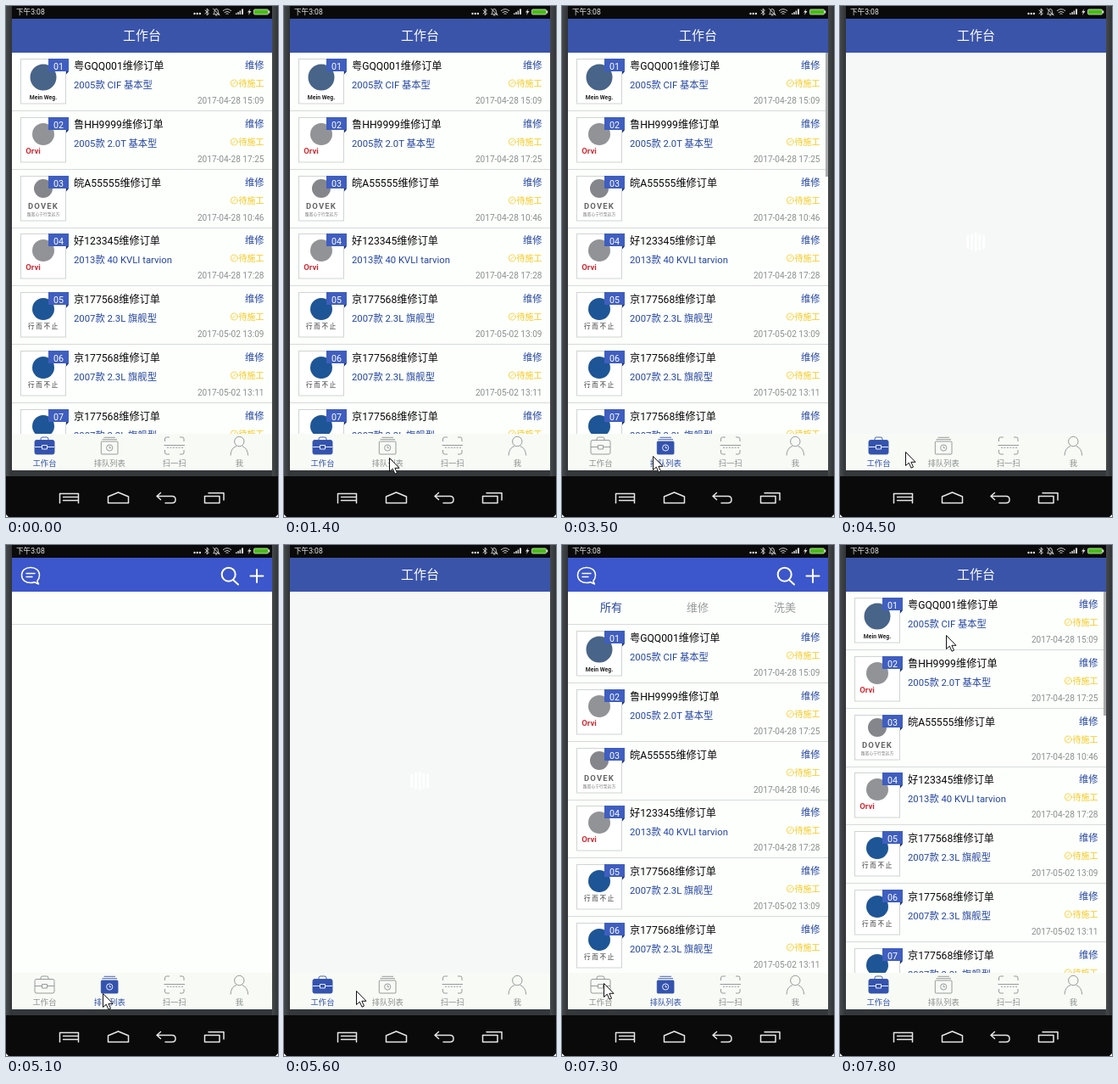
An HTML page that plays this animation: 321x602 px, repeating every 8 s.

```html
<!DOCTYPE html>
<html lang="zh-CN">
<head>
<meta charset="utf-8">
<title>工作台</title>
<style>
html, body { margin: 0; width: 100%; height: 100%; overflow: hidden; background: #fff; }
svg { display: block; font-family: Roboto, "Noto Sans CJK SC", "Noto Sans CJK", sans-serif; }
.line { fill: none; stroke-linecap: round; stroke-linejoin: round; }
.white { stroke: #fff; }
.mid { text-anchor: middle; }
.end { text-anchor: end; }
.blue { fill: #2444a0; }
.tab { fill: #8b9190; font-size: 9.3px; }
.tab .icon { fill: none; stroke: #8b9190; stroke-width: .9; }
.tab.on { fill: #2d4fae; }
.tab.on .icon { stroke: #3453ae; }
.tab.on .body { fill: #3453ae; }
.tab.on .detail { stroke: #fff; }
</style>
</head>
<body>
<svg width="321" height="602" viewBox="0 0 321 602">
  <defs>
    <clipPath id="reveal"><rect id="window" x="7" y="55" width="307" height="449"/></clipPath>
    <linearGradient id="rim"><stop offset="0" stop-color="#45494c"/><stop offset="1" stop-color="#303437"/></linearGradient>
  </defs>

  <path d="M0 0H321V599L318 602H3L0 599Z" fill="#0a0a0a"/>
  <rect width="7" height="554" fill="url(#rim)"/>
  <rect x="314" width="7" height="554" fill="url(#rim)"/>
  <rect x="7" y="547" width="307" height="7" fill="#34383b"/>
  <rect id="paper" x="7" y="15" width="307" height="532"/>

  <g id="status">
    <text x="12" y="10.3" font-size="8.6" fill="#eee">下午3:08</text>
    <g fill="#ddd"><circle cx="222.5" cy="9" r="1.2"/><circle cx="225.7" cy="9" r="1.2"/><circle cx="228.9" cy="9" r="1.2"/>
      <path d="M271 10V8.5H272.5V10ZM273.3 10V7H274.8V10ZM275.6 10V5.5H277.1V10ZM278 10V3.5H280V10ZM288.5 3L285 7.5H287L286 11L289.5 6H287.3Z"/></g>
    <g class="line" stroke="#ddd" stroke-width=".9">
      <path d="M235 5L239.4 8.8L237.2 11V3L239.4 5.2L235 9M245 9.5Q246 8.8 246 6.5Q246 3.5 248 3.5Q250.4 3.5 250.4 6.5Q250.4 8.8 251.4 9.5ZM247.4 11H249M244.5 3L252 11"/>
      <path d="M256.3 5.5Q261 1.6 265.7 5.5M258 7.5Q261 5 264 7.5M259.8 9.2Q261 8.2 262.2 9.2"/>
    </g>
    <rect x="292.5" y="4" width="17" height="6" rx="1.2" fill="#49bd17" stroke="#d9e6d5" stroke-width=".8"/>
    <rect x="310" y="5.5" width="1.3" height="3" fill="#d9e6d5"/>
  </g>

  <g id="workHead">
    <rect x="7" y="15" width="307" height="40" fill="#3a54aa"/>
    <text class="mid" x="160.5" y="39.7" font-size="15" fill="#fff">工作台</text>
  </g>
  <g id="queueHead">
    <rect x="7" y="15" width="307" height="40" fill="#3c56cb"/>
    <g class="line white" stroke-width="1.5">
      <path d="M36.8 42.5Q39.5 39.5 39.5 35.5C39.5 30 35 26.5 29 26.5S18.5 30 18.5 35.5S23 44.5 29 44.5Q31.5 44.5 33.5 43.7L38.5 46ZM24 33.5H34M24 37.5H31"/>
      <path d="M268.5 41.5L274 46.5M288.5 36.5H303.5M296 29V44" stroke-width="2"/>
      <circle cx="262.7" cy="34.7" r="8" stroke-width="2"/>
    </g>
    <path d="M7 93.5H314" stroke="#d6dad8"/>
    <g id="filters" class="mid" font-size="13" fill="#999d9c">
      <text class="blue" x="58" y="78">所有</text><text x="160" y="78">维修</text><text x="263" y="78">洗美</text>
    </g>
  </g>

  <g clip-path="url(#reveal)">
    <g id="list"></g>
    <rect id="bar" x="311" width="3" fill="#a9abab"/>
  </g>
  <g id="loader" fill="#fff"></g>

  <rect x="7" y="504" width="307" height="43" fill="#f8faf5"/>
  <g id="workTab" class="tab">
    <g class="icon"><path d="M41 512V510Q41 508 43 508H48Q50 508 50 510V512"/>
      <rect class="body" x="34" y="511.5" width="23" height="16.5" rx="2"/>
      <path class="detail" d="M34 519.5H42.5M48.5 519.5H57M42.5 517.5H48.5V522H42.5Z"/></g>
    <text class="mid" x="45.5" y="541.5">工作台</text>
  </g>
  <g id="queueTab" class="tab">
    <g class="icon"><path d="M115.5 508.3H129M113.5 510.7H131"/>
      <rect class="body" x="112.3" y="513" width="19.7" height="15" rx="1"/>
      <g class="detail"><circle cx="122.2" cy="520.5" r="3.6"/><path d="M122.2 518.5V520.7H124"/></g></g>
    <text class="mid" x="122.3" y="541.5">排队列表</text>
  </g>
  <g class="tab">
    <g class="icon"><path d="M187.5 513V510Q187.5 508 189.5 508H193M205 508H208Q210 508 210 510V513M210 523V526Q210 528 208 528H205M193 528H189.5Q187.5 528 187.5 526V523M186.5 517.5H211"/>
      <path d="M190 520.3H209" stroke-dasharray="2 1.4"/></g>
    <text class="mid" x="198.7" y="541.5">扫一扫</text>
  </g>
  <g class="tab">
    <g class="icon"><circle cx="275.3" cy="513" r="5.7"/><path d="M265 529.5Q265.5 520.5 272 518.5M278.6 518.5Q285 520.5 285.7 529.5"/></g>
    <text class="mid" x="275.3" y="541.5">我</text>
  </g>

  <g class="line" stroke="#e8e8e8" stroke-width="1.5">
    <path d="M63.5 585.5V574.5H85.5V585.5M67.5 578.5H85M67.5 582.5H85"/>
    <path d="M120.5 585.5V578L132.5 573L144.5 578V585.5Z"/>
    <path d="M182.5 573.5L178 577.5L182.5 581.5M178.5 577.5H196Q200 577.5 200 581.5T196 585.5H188"/>
    <path d="M234.5 577.5H252V585.5H234.5ZM239 573.7H257V582"/>
  </g>
  <path id="cursor" d="M0 0V16L3.8 12.7L6.5 18.7L9 17.6L6.4 11.8H11.5Z" fill="#fff" stroke="#111" stroke-width="1"/>
</svg>

<script>
const LOOP = 8000, STEP = 100, PITCH = 68.8;
const $ = id => document.getElementById(id);
const show = (id, on) => $(id).style.display = on ? '' : 'none';

const disc = (y, r, color) => `<circle cx="44" cy="${y}" r="${r}" fill="${color}"/>`;
const caption = (y, size, color, text, x = 44, extra = '') =>
  `<text class="mid" x="${x}" y="${y}" font-size="${size}" fill="${color}" ${extra}>${text}</text>`;
const bold = 'font-weight="700"';
const logos = {
  navy: disc(29, 15.5, '#486488') + caption(54.5, 6.8, '#222', 'Mein Weg.', 44, bold),
  grey: disc(27, 13, '#929396') + caption(49.5, 9.5, '#cf2a33', 'Orvi', 32, bold),
  silver: disc(22, 11, '#85868b') + caption(46, 9.5, '#666', 'DOVEK', 44, bold + ' letter-spacing="1.2"')
    + caption(54, 4.8, '#777', '路宽心宁行至远方'),
  blue: disc(27, 13, '#1e5596') + caption(50, 7.6, '#333', '行而不止', 44.5, 'letter-spacing="1.6"')
};

const orders = [
  ['粤GQQ001', '2005款 CIF 基本型', '2017-04-28 15:09', 'navy'],
  ['鲁HH9999', '2005款 2.0T 基本型', '2017-04-28 17:25', 'grey'],
  ['皖A55555', '', '2017-04-28 10:46', 'silver'],
  ['好123345', '2013款 40 KVLI tarvion', '2017-04-28 17:28', 'grey'],
  ['京177568', '2007款 2.3L 旗舰型', '2017-05-02 13:09', 'blue'],
  ['京177568', '2007款 2.3L 旗舰型', '2017-05-02 13:11', 'blue'],
  ['京177568', '2007款 2.3L 旗舰型', '2017-05-02 13:12', 'blue']
];

$('list').innerHTML = orders.map(([plate, model, date, logo], i) => `
  <g transform="translate(0 ${Math.round(i * PITCH)})">
    <rect x="17.5" y="7.5" width="53" height="52.5" fill="#fff" stroke="#d0d4d2"/>
    <g class="logo">${logos[logo]}</g>
    <path d="M50 7H74V22H50Z" fill="#3f5ebf"/><path d="M71 22H74L71 25.5Z" fill="#1d2f68"/>
    ${caption(19.7, 10.7, '#fff', '0' + (i + 1), 62)}
    <text x="80" y="19.5" font-size="12.2" fill="#080808">${plate}维修订单</text>
    <text class="blue" x="80" y="41.5" font-size="11.3">${model}</text>
    <text class="blue end" x="304.5" y="19" font-size="11.3">维修</text>
    <g class="line" stroke="#f6cb22" stroke-width=".8"><circle cx="269.3" cy="36" r="4"/><path d="M267.6 37.8L271 34.2"/></g>
    <text class="end" x="304.5" y="39.7" font-size="10" fill="#f6c81a">待施工</text>
    <text class="end" x="304.5" y="60" font-size="10.1" fill="#8c8f8e">${date}</text>
    <path d="M7 68.5H314" stroke="#d6dad8"/>
  </g>`).join('');

$('loader').innerHTML = [0, 1, 2, 3, 4].map(i => `<rect x="${149.5 + i * 4.7}" width="2.6" rx="1"/>`).join('');

// time, page, highlighted tab, stage, scrollbar
const scenes = [
  [0, 'work', 'work', 'full', 0],
  [1800, 'work', 'queue', 'full', 0],
  [1900, 'queue', 'queue', 'blank', 0],
  [2000, 'queue', 'queue', 'part', 1],
  [2100, 'queue', 'queue', 'full', 1],
  [2300, 'queue', 'queue', 'full', 0],
  [3000, 'work', 'work', 'blank', 0],
  [3200, 'work', 'work', 'full', 1],
  [3500, 'work', 'queue', 'full', 1],
  [3600, 'queue', 'queue', 'blank', 0],
  [3700, 'queue', 'queue', 'part', 1],
  [3800, 'queue', 'queue', 'full', 0],
  [4500, 'work', 'work', 'blank', 0],
  [4700, 'work', 'work', 'full', 1],
  [4900, 'work', 'work', 'full', 0],
  [5100, 'queue', 'queue', 'blank', 0],
  [5200, 'queue', 'queue', 'part', 1],
  [5300, 'queue', 'queue', 'full', 1],
  [5500, 'work', 'work', 'blank', 0],
  [5700, 'work', 'work', 'full', 1],
  [5900, 'work', 'work', 'full', 0],
  [6200, 'queue', 'queue', 'blank', 0],
  [6300, 'queue', 'queue', 'part', 1],
  [6400, 'queue', 'queue', 'full', 0],
  [7600, 'work', 'work', 'blank', 0],
  [7800, 'work', 'work', 'full', 1]
];

// pointer moves: first step, last step, x, y
const moves = [
  [700, 700, 287, 590], [800, 900, 138, 93], [1000, 1000, 215, 575],
  [1200, 1400, 124, 532], [1600, 1600, 123, 530], [1800, 2100, 100, 530],
  [2200, 2600, 68, 530], [2700, 2800, 61, 529], [3000, 3200, 72, 530],
  [3300, 3500, 107, 530], [3600, 3800, 103, 530], [3900, 4200, 56, 526],
  [4300, 4300, 61, 525], [4500, 4500, 77, 525], [4600, 4900, 110, 526],
  [5100, 5100, 114, 528], [5200, 5500, 72, 525], [5600, 5900, 124, 525],
  [6000, 6000, 123, 525], [6200, 6300, 107, 512], [6400, 6400, 95, 515],
  [6700, 6800, 75, 234], [6900, 7000, 65, 516], [7200, 7300, 49, 516],
  [7400, 7400, 58, 516], [7600, 7600, 62, 515], [7700, 7800, 125, 106]
];

function pointerAt(t) {
  let x = 0, y = 0;
  for (const [from, to, nx, ny] of moves) {
    if (t < from) break;
    const start = from - STEP, k = Math.min(1, (t - start) / (to - start));
    x += (nx - x) * k;
    y += (ny - y) * k;
  }
  return [x, y];
}

function draw(t) {
  const [, page, tab, stage, bar] = scenes.filter(s => s[0] <= t).pop();
  const queue = page === 'queue', blank = stage === 'blank', full = stage === 'full';
  const top = queue ? 94 : 55;
  const clipTop = stage === 'part' ? 243 : top;

  $('paper').setAttribute('fill', blank && !queue ? '#f6f8f7' : '#fdfffd');
  show('workHead', !queue);
  show('queueHead', queue);
  show('filters', full);
  show('list', !blank);
  show('bar', bar);
  show('loader', blank && !queue);
  document.querySelectorAll('.logo').forEach(g => g.style.display = full ? '' : 'none');

  $('list').setAttribute('transform', `translate(0 ${top})`);
  $('window').setAttribute('y', clipTop);
  $('window').setAttribute('height', 504 - clipTop);
  $('bar').setAttribute('y', top);
  $('bar').setAttribute('height', queue ? 189 : 146);
  $('workTab').classList.toggle('on', tab === 'work');
  $('queueTab').classList.toggle('on', tab === 'queue');

  [...$('loader').children].forEach((r, i) => {
    const h = 19 + 3 * Math.cos(i * 1.6 + t / 160);
    r.setAttribute('y', 278 - h / 2);
    r.setAttribute('height', h);
  });

  show('cursor', t >= moves[0][0]);
  const [x, y] = pointerAt(t);
  $('cursor').setAttribute('transform', `translate(${Math.round(x) + .5} ${Math.round(y) + .5})`);
}

const born = performance.now();
function tick() {
  const t = (performance.now() - born) % LOOP;
  draw(Math.floor(t / STEP) * STEP);
  requestAnimationFrame(tick);
}
tick();
</script>
</body>
</html>
```
